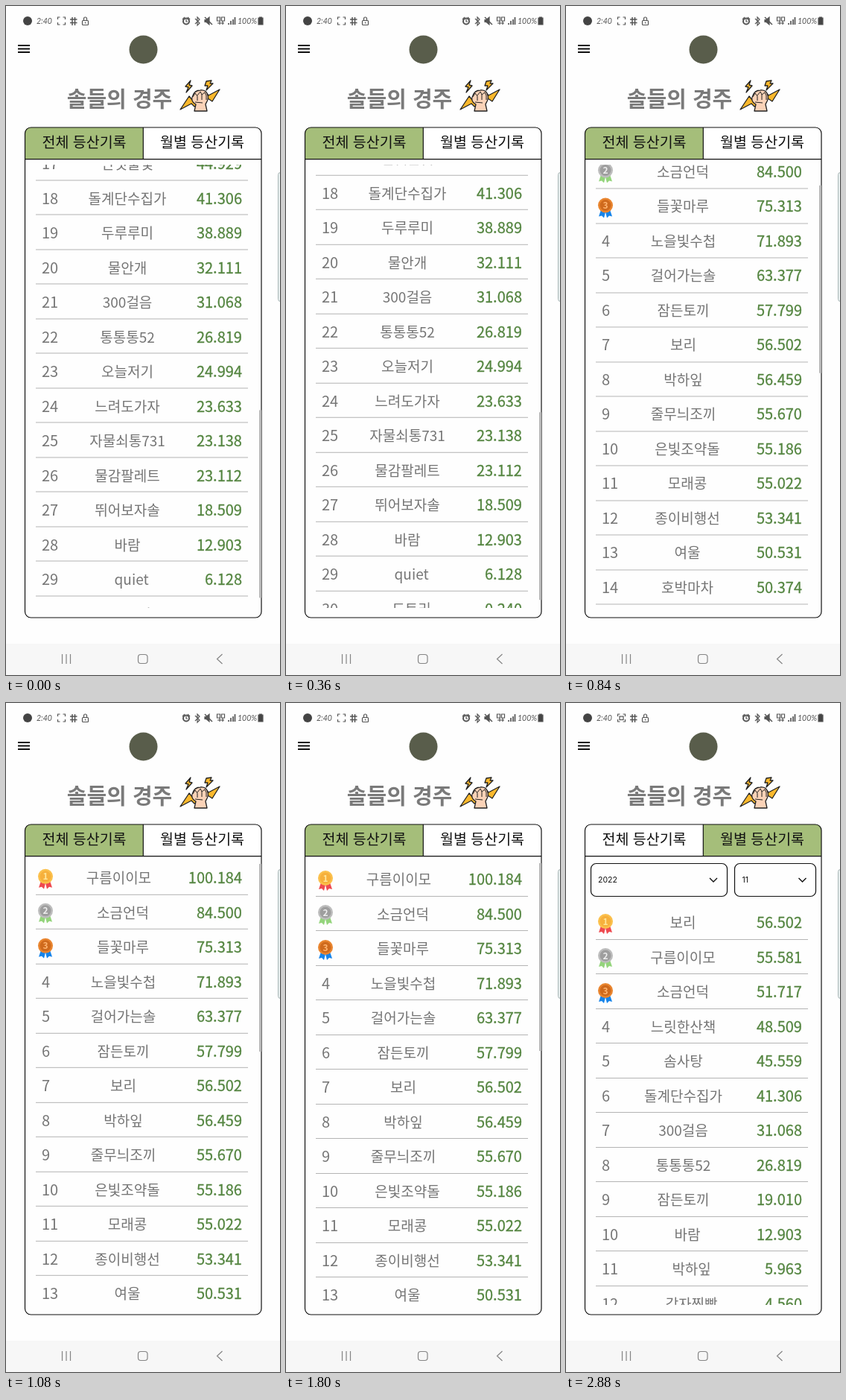
Write an HTML page that moves like this. It is 368 px wide and 898 px high and loops after 3 s.

```html
<!DOCTYPE html>
<html lang="ko">
<head>
<meta charset="utf-8">
<style>
html, body { margin: 0; width: 100%; height: 100%; overflow: hidden; background: #fefefe; }
body, svg text { font-family: "Noto Sans CJK KR", "Noto Sans CJK", sans-serif; }
#chrome { position: absolute; left: 0; top: 0; }
.view { position: absolute; left: 40px; width: 285px; overflow: hidden; }
#total { top: 213px; height: 595px; }
#monthly { top: 271px; height: 537px; }
.row { display: flex; justify-content: space-between; align-items: center; box-sizing: border-box;
  height: 46.5px; padding: 0 8px; border-bottom: 1px solid #b4b4b4; color: #757575; font-size: 19px; white-space: nowrap; }
.row b { font-size: 20px; font-weight: 500; color: #548540; -webkit-text-stroke: .3px #548540; }
.row i { font-size: 20px; font-style: normal; }
.row svg { position: relative; top: 2px; margin: 0 -6px; }
#thumb { position: absolute; left: 340px; top: 215px; width: 3px; height: 252px; background: #b9b9b9; }
</style>
</head>
<body>
<svg id="chrome" width="368" height="898" fill="none">
  <!-- status bar -->
  <g stroke="#555" stroke-width="1.2">
    <circle cx="29" cy="20" r="6" fill="#444" stroke="none"/>
    <path d="M69.500 18v-3h3M76.500 15h3v3M79.500 22v3h-3M72.500 25h-3v-3"/>
    <g id="recording"><rect x="72" y="18" width="5" height="4.500"/></g>
    <path d="M89 15v11M92.500 15v11M86 18h9.500M86 22.500h9.500" stroke-width="1.500"/>
    <rect x="102.500" y="19.500" width="8" height="6" rx="1"/><path d="M104.500 19v-2a2 2 0 0 1 4 0v2M106.500 21.500v2"/>
    <circle cx="242" cy="20.500" r="4" stroke-width="2"/><path d="M237 18l3-3M247 18l-3-3M242 18v3h2"/>
    <path d="M254 17l6 6-3 3V15l3 3-6 6"/>
    <path d="M267 18.500h2l4-3.500v10l-4-3.500h-2z" fill="#555"/><path d="M267 15l10 10" stroke-width="1.500"/>
    <path d="M283.500 15h4v5h-4zM289.500 15h4v5h-4zM284 23h9M287 20v5M291 20v5"/>
    <path d="M299 25v-2M302 25v-5M305 25v-7M307.500 25v-10" stroke-width="1.700"/>
    <path d="M339 16h1.500v-1h3v1h1.500v9h-6z" fill="#444"/>
  </g>
  <g fill="#555" font-size="10.500" font-style="italic" style="font-family:Lato,sans-serif">
    <text x="41" y="24" style="font-family:inherit">2:40</text><text x="311" y="24" style="font-family:inherit">100%</text>
  </g>
  <path d="M16 53h16M16 57.500h16M16 62h16" stroke="#111" stroke-width="2"/>
  <circle cx="184.500" cy="58.500" r="19" fill="#595d4b"/>

  <!-- heading -->
  <text x="152.500" y="136" font-size="29" font-weight="700" fill="#7a7a7a" text-anchor="middle">솔들의 경주</text>
  <g stroke="#222" stroke-width="1.300" stroke-linejoin="round">
    <path d="M234 139l12-18 4 5 18-11 4 5 15-8-10 16-6-4-18 11-4-4z" fill="#fbb82c"/>
    <path d="M248 100l-7 8 4 1-3 7 8-9-4-1zM269 101l7-1-2 4h4l-9 9 2-6h-4z" fill="#fbb82c"/>
    <path d="M253 141l2-9c-6-3-6-8-4-12 2-5 6-7 10-7 5-1 9 2 10 7 2 6-2 9-3 12l2 9z" fill="#fbd3b8"/>
    <path d="M251 122l3-5 3 4v6M257 120l4-5 2 4v7M263 119l4-3 2 4v6M254 129l10 1" stroke-width="1"/>
  </g>

  <!-- card with tabs -->
  <clipPath id="card"><rect x="25.500" y="163" width="317.500" height="658" rx="8"/></clipPath>
  <g clip-path="url(#card)">
    <rect id="tabTotal" x="25" y="163" width="159" height="43"/>
    <rect id="tabMonthly" x="184" y="163" width="160" height="43"/>
  </g>
  <g font-size="19.500" fill="#111" text-anchor="middle">
    <text x="105" y="190">전체 등산기록</text><text x="263.500" y="190">월별 등산기록</text>
  </g>
  <rect id="press" x="184" y="163" width="159" height="43" clip-path="url(#card)" fill="#000"/>
  <g stroke="#111" stroke-width="1.200">
    <rect x="25.500" y="163" width="317.500" height="658" rx="8"/>
    <path d="M25.500 205.700H343M184.300 163v43"/>
  </g>
  <g id="selects" stroke="#111" stroke-width="1.200">
    <rect x="33.500" y="215.500" width="183" height="44" rx="7"/>
    <rect x="226.500" y="215.500" width="109" height="44" rx="7"/>
    <path d="M193 235l5 5 5-5M312.500 235l5 5 5-5" stroke-width="1.400"/>
    <g fill="#111" stroke="none" font-size="10.500"><text x="43" y="240.500" style="font-family:Inter,sans-serif">2022</text><text x="236.500" y="240.500" style="font-family:Inter,sans-serif">11</text></g>
  </g>

  <!-- edge handle and navigation bar -->
  <rect x="365.500" y="223.500" width="8" height="173" rx="3" fill="#e8efef" stroke="#a9b5b5"/>
  <rect y="856" width="368" height="42" fill="#f7f7f7"/>
  <g stroke="#858585" stroke-width="1.200">
    <path d="M75.500 870v13M81 870v13M86.500 870v13M290.500 870l-7 6.500 7 6.500"/>
    <rect x="177.500" y="870.500" width="12.500" height="12" rx="3.500"/>
  </g>
</svg>
<div class="view" id="total"><div id="totalRows"></div></div>
<div class="view" id="monthly"></div>
<div id="thumb"></div>

<script>
const LOOP = 3000, STEP = 120, MAX_SCROLL = 801.5;
const GREEN = "#a5be7a";
const $ = id => document.getElementById(id);

const totalRecords = `구름이이모 100.184,소금언덕 84.500,들꽃마루 75.313,노을빛수첩 71.893,걸어가는솔 63.377,
잠든토끼 57.799,보리 56.502,박하잎 56.459,줄무늬조끼 55.670,은빛조약돌 55.186,모래콩 55.022,종이비행선 53.341,
여울 50.531,호박마차 50.374,느릿한산책 48.509,솜사탕 45.559,반딧불빛 44.929,돌계단수집가 41.306,두루루미 38.889,
물안개 32.111,300걸음 31.068,통통통52 26.819,오늘저기 24.994,느려도가자 23.633,자물쇠통731 23.138,
물감팔레트 23.112,뛰어보자솔 18.509,바람 12.903,quiet 6.128,도토리 0.240`;
const monthlyRecords = `보리 56.502,구름이이모 55.581,소금언덕 51.717,느릿한산책 48.509,솜사탕 45.559,돌계단수집가 41.306,
300걸음 31.068,통통통52 26.819,잠든토끼 19.010,바람 12.903,박하잎 5.963,감자찐빵 4.560`;

// rim, face, digit, ribbon
const medals = [
  ["#fbc04c", "#f6b03c", "#ffe69a", "#ef4a50"],
  ["#bdbdbd", "#9e9e9e", "#eeeeee", "#94d47c"],
  ["#e9852f", "#cf6a1d", "#ffb571", "#1684ea"],
];

function medal(i) {
  const [rim, face, digit, ribbon] = medals[i];
  return `<svg width="22" height="28"><path d="M5 17L2 26l4-1 3 3 2-8 2 8 3-3 4 1-3-9z" fill="${ribbon}"/>
    <circle cx="11" cy="11" r="10" fill="${rim}"/><circle cx="11" cy="11" r="7.5" fill="${face}"/>
    <text x="11" y="15.500" font-size="12" font-weight="700" text-anchor="middle" fill="${digit}">${i + 1}</text></svg>`;
}

function rows(records) {
  return records.split(",").map((record, i) => {
    const [name, km] = record.trim().split(" ");
    const rank = i < medals.length ? medal(i) : `<i>${i + 1}</i>`;
    return `<div class="row">${rank}<span>${name}</span><b>${km}</b></div>`;
  }).join("");
}

// Settle at the end of the list, then fling back to the top.
function scrollAt(t) {
  if (t < 240) return MAX_SCROLL - 32 * (1 - t / 240) ** 2;
  const left = Math.min(1, Math.max(0, (1198 - t) / 847));
  return MAX_SCROLL * left ** 3;
}

function pressAt(t) {
  if (t < 1920) return 0;
  return 0.31 * Math.min(1, Math.max(0, (2280 - t) / 240));
}

function draw() {
  const t = Math.floor(performance.now() % LOOP / STEP) * STEP;
  const scroll = scrollAt(t), monthly = t >= 2040;
  $("totalRows").style.transform = `translateY(${-scroll}px)`;
  $("thumb").style.transform = `translateY(${scroll * 0.4255}px)`;
  for (const id of ["total", "thumb"]) $(id).style.display = monthly ? "none" : "";
  for (const id of ["monthly", "selects"]) $(id).style.display = monthly ? "" : "none";
  $("tabTotal").style.fill = monthly ? "#fff" : GREEN;
  $("tabMonthly").style.fill = monthly ? GREEN : "#fff";
  $("press").style.opacity = pressAt(t);
  $("recording").style.opacity = t % 800 < 400 ? 0 : 1;
  requestAnimationFrame(draw);
}

$("totalRows").innerHTML = rows(totalRecords);
$("monthly").innerHTML = rows(monthlyRecords);
draw();
</script>
</body>
</html>
```
